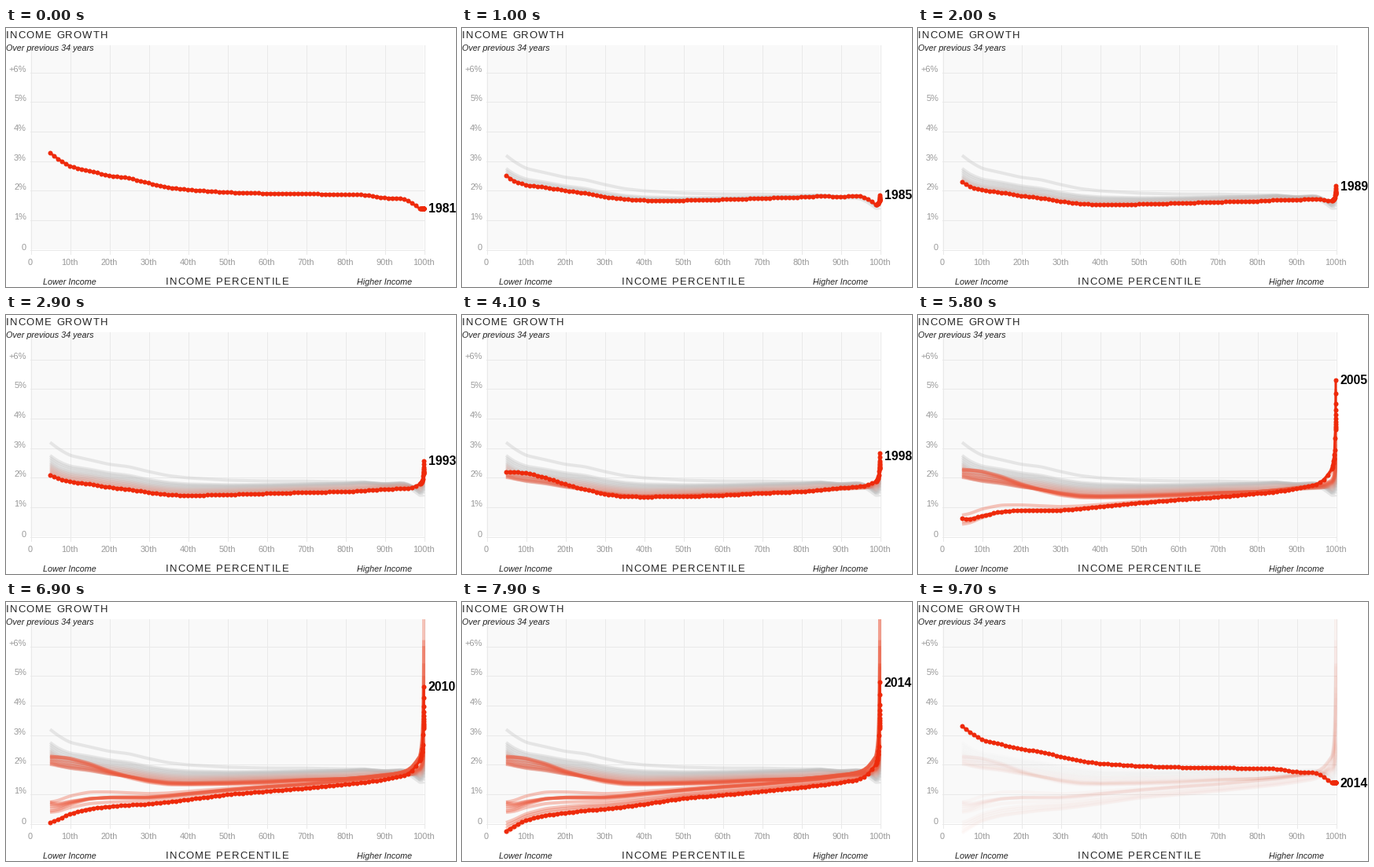
These frames come from a looping animation (572 px wide and 330 px high, 9.8 s). A matplotlib script:

```python
import math

import numpy as np
import matplotlib.pyplot as plt
from matplotlib.animation import FuncAnimation
from matplotlib.collections import LineCollection
from matplotlib.patches import Rectangle

W, H, DPI = 572, 330, 100
FRAMES, STEP_MS = 98, 100
YEAR_MS = 238
FADE_FRAME = 96
LEFT, RIGHT, TOP, ZERO = 31, 531, 22, 282
PX_PER_PCT = 37.65
RED = "#ee2a0b"

# Growth (%) by income percentile for a few representative periods.
NODES = [5, 7, 10, 15, 20, 25, 30, 35, 40, 50, 60, 70, 80, 85, 90, 95, 97, 99]
SHAPES = np.array([
    [3.29, 3.08, 2.83, 2.67, 2.51, 2.43, 2.26, 2.11, 2.03,
     1.94, 1.90, 1.89, 1.85, 1.85, 1.74, 1.71, 1.57, 1.37],
    [2.50, 2.31, 2.18, 2.10, 1.99, 1.91, 1.78, 1.70, 1.66,
     1.66, 1.69, 1.73, 1.77, 1.81, 1.78, 1.82, 1.71, 1.51],
    [2.08, 1.95, 1.85, 1.77, 1.66, 1.59, 1.49, 1.41, 1.38,
     1.41, 1.45, 1.49, 1.51, 1.55, 1.59, 1.62, 1.63, 1.77],
    [2.24, 2.26, 2.23, 2.05, 1.79, 1.59, 1.43, 1.34, 1.33,
     1.34, 1.38, 1.46, 1.51, 1.57, 1.65, 1.70, 1.75, 1.87],
    [0.61, 0.58, 0.70, 0.84, 0.88, 0.88, 0.88, 0.93, 1.00,
     1.13, 1.24, 1.33, 1.45, 1.51, 1.61, 1.75, 1.89, 2.28],
    [-0.27, -0.11, 0.11, 0.27, 0.35, 0.43, 0.48, 0.56, 0.65,
     0.85, 0.96, 1.08, 1.22, 1.29, 1.38, 1.49, 1.65, 1.99],
])

# Each pair of rows: years, then the value reached in that year.
SHAPE_POS = ([1980, 1981, 1984.2, 1992.2, 1998.2, 2000, 2001, 2002,
              2004.4, 2007, 2009, 2012, 2013.2],
             [0, 0.7, 1, 2, 3, 3.1, 3.75, 3.95, 4, 4.1, 4.55, 4.95, 5])
POOR_SHIFT = ([1992.2, 1994.5, 1997, 1998.2, 2000, 2001, 2002, 2004.4,
               2007, 2009, 2012, 2013, 2014],
              [0, -0.17, -0.05, 0, 0.2, -0.3, -0.28, 0,
               0.2, -0.1, -0.05, -0.07, 0.25])
TOP_GROWTH = ([1980, 1981, 1984.2, 1988, 1992.2, 1996, 1998.2, 2000, 2001,
               2002, 2004.4, 2005.2, 2006, 2007, 2008, 2009, 2010, 2011,
               2012, 2013, 2014],
              [1.38, 1.5, 1.83, 2.1, 2.55, 2.75, 2.88, 3.4, 3.95,
               3.5, 5.29, 5.45, 6.2, 7.0, 6.0, 4.6, 5.4, 5.3,
               7.6, 4.4, 6.0])
LABEL_DROP = ([1996.5, 1998.2, 2000], [0, 9, 0])

BODY = np.arange(5, 100)
TAIL = np.concatenate([99 + np.arange(1, 10) / 10,
                       99.9 + np.arange(1, 10) / 100, [99.999]])
TAIL_RISE = np.interp(-np.log10(1 - TAIL / 100) - 2,
                      [0, 0.5, 0.7, 1, 1.5, 2, 3],
                      [0, 0.2, 0.35, 0.44, 0.65, 0.85, 1])
XS = LEFT + 5 * np.concatenate([BODY, TAIL])


def to_y(pct):
    return ZERO - PX_PER_PCT * pct


def curve(year):
    """Pixel points of the growth curve at a fractional year."""
    pos = np.interp(year, *SHAPE_POS)
    i = min(int(pos), len(SHAPES) - 2)
    mix = pos - i
    knots = SHAPES[i] * (1 - mix) + SHAPES[i + 1] * mix
    body = np.interp(BODY, NODES, knots)
    body += np.interp(year, *POOR_SHIFT) * np.exp(-(BODY - 5) / 8)
    body[1:-1] = (body[:-2] + 2 * body[1:-1] + body[2:]) / 4
    top = np.interp(year, *TOP_GROWTH)
    tail = body[-1] + (top - body[-1]) * TAIL_RISE
    return np.column_stack([XS, to_y(np.concatenate([body, tail]))])


def trail_color(year):
    grey, salmon = np.array([192, 192, 192]), np.array([236, 88, 60])
    k = min(max((year - 1984) / 12, 0), 1)
    return (grey + (salmon - grey) * k) / 255


plt.rcParams["font.family"] = "Liberation Sans"
fig = plt.figure(figsize=(W / DPI, H / DPI), dpi=DPI, facecolor="white")
ax = fig.add_axes([0, 0, 1, 1])
ax.set_xlim(0, W)
ax.set_ylim(H, 0)
ax.axis("off")


def px(size):
    return size * 72 / DPI


def write(x, y, text, size, color="#222222", **style):
    return ax.text(x, y, text, fontsize=px(size), color=color,
                   va="baseline", zorder=6, **style)


def advance(char, size):
    """Width a character takes up, blanks included."""
    renderer = fig.canvas.get_renderer()
    widths = []
    for sample in ("H" + char + "H", "HH"):
        probe = write(0, 0, sample, size)
        widths.append(probe.get_window_extent(renderer).width)
        probe.remove()
    return widths[0] - widths[1]


def write_spaced(x, y, text, size, gap):
    for char in text:
        write(x, y, char, size)
        x += advance(char, size) + gap


# Plot area, grid and axis labels
ax.add_patch(Rectangle((LEFT, TOP), RIGHT - LEFT, ZERO - TOP,
                       facecolor="#f9f9f9", lw=0, zorder=0))
for i in range(11):
    x = LEFT + 50 * i
    ax.plot([x + 0.5] * 2, [TOP, ZERO + 6], color="#e9e9e9", lw=px(1), zorder=1)
    name = "0" if i == 0 else f"{10 * i}th"
    write(x, 302, name, 11, "#999999", ha="center")
for pct in range(7):
    y = math.floor(to_y(pct)) + 0.5
    ax.plot([LEFT, RIGHT], [y, y], color="#e9e9e9", lw=px(1), zorder=1)
    name = "0" if pct == 0 else f"{'+' if pct == 6 else ''}{pct}%"
    write(26, y + (0.5 if pct == 0 else -0.5), name, 11, "#999999", ha="right")

write_spaced(0, 13, "INCOME GROWTH", 13, 1.15)
write_spaced(203, 327, "INCOME PERCENTILE", 13, 1.15)
write(0, 29, "Over previous 34 years", 10.7, style="italic")
write(47, 327, "Lower Income", 10.8, style="italic")
write(446, 327, "Higher Income", 10.8, style="italic")

# Moving parts
TRAIL_YEARS = np.array([1980.2] + list(range(1981, 2015)))
trail_paths = [curve(year) for year in TRAIL_YEARS]
trail_colors = [trail_color(year) for year in TRAIL_YEARS]

trails = LineCollection([], linewidths=px(4), capstyle="butt", zorder=2)
ax.add_collection(trails, autolim=False)
line, = ax.plot([], [], color=RED, lw=px(3), marker="o", markersize=px(6),
                markeredgewidth=0, zorder=4)
window = Rectangle((LEFT, TOP), W - LEFT, 280, transform=ax.transData)
trails.set_clip_path(window)
line.set_clip_path(window)
label = write(536.5, 0, "", 15.7, "black", weight="bold")


def update(frame):
    fading = frame >= FADE_FRAME
    now = min(1980 + (frame * STEP_MS + 10) / YEAR_MS, 2014)
    shown = int((TRAIL_YEARS < now).sum())
    strength = 0.34
    if fading:
        strength *= 0.5 if frame == FADE_FRAME else 0.08
    trails.set_segments(trail_paths[:shown])
    trails.set_color([(*c, strength) for c in trail_colors[:shown]])

    points = curve(1980 if fading else now)
    line.set_data(points[:, 0], points[:, 1])

    drop = 0 if fading else np.interp(now, *LABEL_DROP)
    label.set_text(str(math.ceil(now)))
    label.set_y(max(points[-1, 1] + drop, TOP + 1) + 5.5)
    return trails, line, label


anim = FuncAnimation(fig, update, frames=FRAMES, interval=STEP_MS,
                     init_func=lambda: update(0), repeat=True,
                     repeat_delay=0, blit=False)
plt.show()
```
